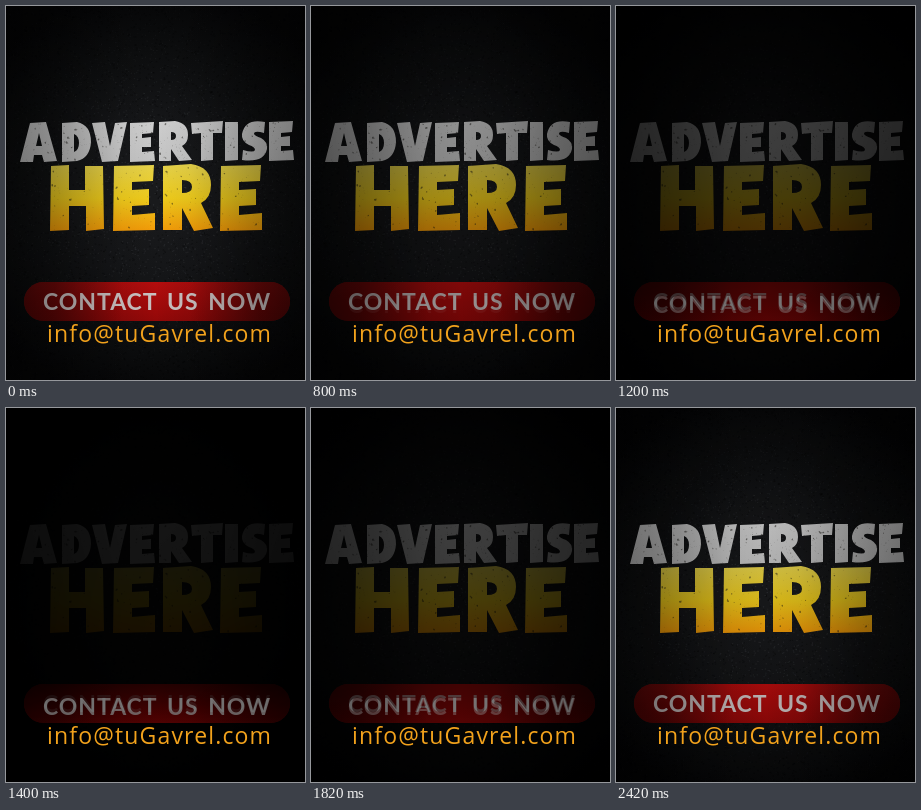
An HTML page with a canvas that plays this animation: 299 by 374 pixels, repeating every 2.52 s.

```html
<!DOCTYPE html>
<html lang="en">
<head>
<meta charset="utf-8">
<title>Advertise here</title>
<style>
html, body { margin: 0; width: 100%; height: 100%; overflow: hidden; background: #000; }
canvas { display: block; }
</style>
</head>
<body>
<canvas id="stage" width="299" height="374" role="img" aria-label="Advertise here. Contact us now"></canvas>
<script>
const W = 299, H = 374, LOOP = 2520;
const stage = document.getElementById('stage').getContext('2d');

let seed = 7;
const rand = () => (seed = (seed * 16807) % 2147483647) / 2147483647;

function layer(draw) {
  const c = document.createElement('canvas');
  c.width = W;
  c.height = H;
  draw(c.getContext('2d'));
  return c;
}

function blend(grad, ...colors) {
  colors.forEach((c, i) => grad.addColorStop(i / (colors.length - 1), c));
  return grad;
}

const fade = (g, y0, y1, ...colors) => blend(g.createLinearGradient(0, y0, 0, y1), ...colors);

// Darkness growing from the middle to both sides
function sides(g, dark) {
  const shade = a => `rgba(0,0,0,${a * dark})`;
  return blend(g.createLinearGradient(15, 0, 285, 0),
    shade(1), shade(.78), shade(.45), shade(.12), shade(0), shade(.12), shade(.45), shade(.78), shade(1));
}

function label(g, text, x, y, font, color, spacing, gap = 0) {
  g.font = font;
  g.letterSpacing = spacing + 'px';
  g.wordSpacing = gap + 'px';
  g.fillStyle = color;
  g.fillText(text, x, y);
}

// Hand-cut lettering
const smallE = 'M124 117L148 116L147 127L136 128V132L145 131V141H136V146L148 145L149 155L124 156Z';
const bigE = 'M108 160L148 159L147 175L126 176V184L143 183V199L126 200V209L149 207V224L107 225Z';

function word(paths, repeat, dx, dy) {
  const p = new Path2D(paths.join('') + repeat);
  p.addPath(new Path2D(repeat), { e: dx, f: dy });
  return p;
}

const advertise = word([
  'M24 117L40 116L51 155L38 156L36 149H28L27 156H14ZM33 127L30 140H36Z',
  'M56 117L71 116Q85 119 85 136Q84 152 71 155L56 156ZM68 128V146Q73 144 73 137Q73 130 68 128Z',
  'M86 117L99 116L104 140L109 117L121 116L112 155L96 156Z',
  'M153 116L169 115Q182 117 182 129Q182 137 176 140L186 154L173 155L165 143V155H153ZM165 126V134Q170 134 170 130Q170 126 165 126Z',
  'M185 117L217 115L216 127H207V154L195 155V127L186 128Z',
  'M219 116H232V154L219 155Z',
  'M259 116L258 127Q248 124 248 128Q249 130 255 132Q262 136 261 143Q258 157 236 154L237 144Q248 147 249 144Q249 141 243 139Q235 135 236 128Q239 112 259 116Z'
], smallE, 139, -1);

const here = word([
  'M45 160L63 159V184H79V160H97L98 223L80 225V200H63V224L44 225Z',
  'M157 160L185 158Q205 161 205 179Q205 192 195 197L207 222L188 225L176 202V224H157ZM176 174V187Q186 187 186 181Q186 174 176 174Z'
], bigE, 107, 0);

function worn(g, path, fill, y, h, count) {
  g.save();
  g.fillStyle = fill;
  g.fill(path, 'evenodd');
  g.clip(path, 'evenodd');
  g.fillStyle = 'rgba(25,22,18,.5)';
  for (let i = 0; i < count; i++) {
    const size = .25 + rand() ** 5 * 1.1;
    g.beginPath();
    g.ellipse(15 + rand() * 272, y + rand() * h, size, size * .7, rand() * 3, 0, 7);
    g.fill();
  }
  g.restore();
}

function button(g, ...fills) {
  g.beginPath();
  g.roundRect(18, 276, 266, 39, 19.5);
  for (g.fillStyle of fills) g.fill();
}

function contact(g, y, color) {
  label(g, 'CONTACT US NOW', 37, y, '700 23px Lato, sans-serif', color, .95, 3);
}

const bright = layer(g => {
  g.fillStyle = blend(g.createRadialGradient(150, 190, 20, 150, 190, 210),
    '#191a1c', '#141517', '#0c0d0e', '#040405');
  g.fillRect(0, 0, W, H);
  for (let i = 0; i < 7000; i++) {
    const x = rand() * W, y = rand() * H;
    const near = Math.max(.15, 1 - Math.hypot(x - 150, y - 185) / 210);
    g.fillStyle = rand() < .5 ? `rgba(130,135,140,${.18 * near})` : 'rgba(0,0,0,.3)';
    g.fillRect(x, y, 1.3, 1.2);
  }
  worn(g, advertise, fade(g, 116, 156, '#cecece', '#c4c4c4'), 116, 40, 380);
  worn(g, here, fade(g, 159, 225, '#e6d24a', '#eecb1c', '#f29a08'), 159, 66, 300);
  button(g, fade(g, 276, 315, '#b40d0d', '#930808'), sides(g, .5));
  contact(g, 304, '#c9c0c0');
  g.fillStyle = sides(g, .38);
  g.fillRect(0, 0, W, H);
});

const dim = layer(g => {
  button(g, fade(g, 276, 315, '#160000', '#300000', '#520303'), sides(g, .6));
  contact(g, 307, '#777');
});

// Fade level 0 (lit) to 10 (dark), with a slightly longer hold at the bottom
function level(t) {
  if (t < 600) return 0;
  if (t < 1500) return Math.floor((t - 500) / 100);
  if (t < 1620) return 10;
  return 9 - Math.floor((t - 1620) / 100);
}

function frame(now) {
  const k = level(now % LOOP) / 10;
  stage.globalAlpha = 1;
  stage.fillStyle = '#000';
  stage.fillRect(0, 0, W, H);
  stage.globalAlpha = k;
  stage.drawImage(dim, 0, 0);
  stage.globalAlpha = 1 - k;
  stage.drawImage(bright, 0, 0);
  stage.globalAlpha = 1;
  label(stage, 'info@tuGavrel.com', 41, 336, '400 23px "Open Sans", sans-serif', '#f2a21c', 1.15);
  requestAnimationFrame(frame);
}
requestAnimationFrame(frame);
</script>
</body>
</html>
```
